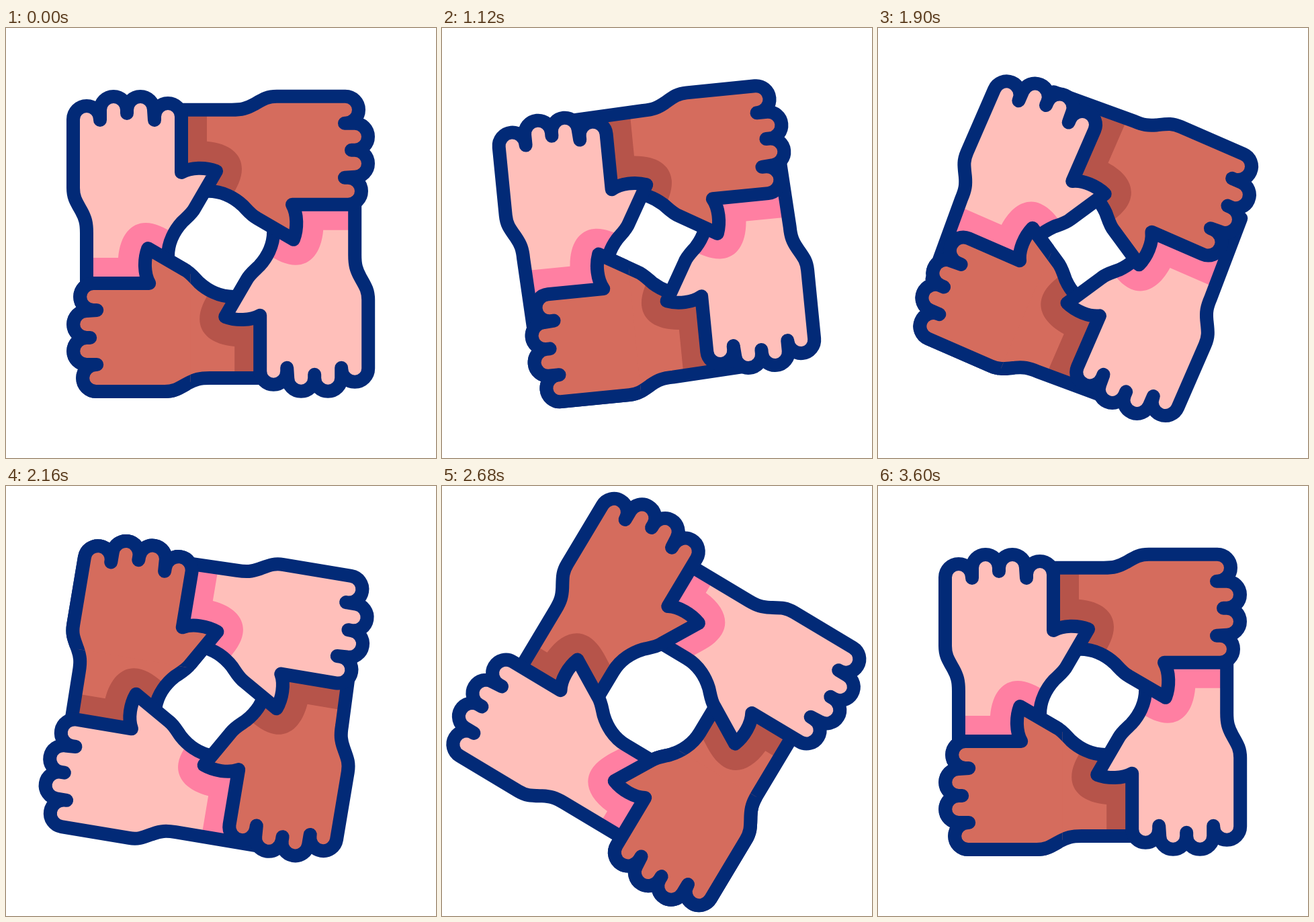
Write an HTML page with a canvas that moves like this. It is 640x640 px and loops after 3620 ms.

```html
<!DOCTYPE html>
<html lang="en">
<head>
<meta charset="utf-8">
<title>Linked hands</title>
<style>
  html, body { margin: 0; width: 100%; height: 100%; overflow: hidden; background: #fff; }
  canvas { display: block; width: 100vw; height: 100vh; }
</style>
</head>
<body>
<canvas id="stage" width="640" height="640"></canvas>
<script>
const ctx = document.getElementById('stage').getContext('2d');
const LOOP = 3620, STAGGER = 60;
const CX = 319.6, CY = 321.4;
const NAVY = '#022a77';
const SKIN = [
  { base: '#ffbfba', shade: '#ff7fa2' },
  { base: '#d56c5d', shade: '#b6544a' }
];

// Upright hand: wrist, four fingers, thumb; the wrist leans in by `lean`
const handPath = lean => new Path2D(`M${120 + lean} 432 L120 305
  C120 290 118 283 112 272 C104 258 100 252 100 238 V136
  A20 20 0 0 1 140 136 V137 V122 A20 20 0 0 1 180 122 V127 V122 A20 20 0 0 1 220 122
  L221 137 V132 A20 20 0 0 1 261 132 V215 C275 207 297 207 313 213
  L281 268 C277 276 268 283 262 289 C252 300 241 318 241 340 V432 Z`);
// Shade cast by the neighbouring hand
const shade = new Path2D(`M40 342 H167 C170 308 186 290 208 290
  C222 290 236 297 250 306 L310 342 V460 H40 Z`);

const phase = (t, from, to) => Math.min(1, Math.max(0, (t - from) / (to - from)));
const sine = u => (1 - Math.cos(Math.PI * u)) / 2;
const cubic = u => u < 0.5 ? 4 * u ** 3 : 1 - 4 * (1 - u) ** 3;

// Distance covered when speeding up, cruising and braking
function travel(t, total, time, up, down) {
  const speed = total / (time - (up + down) / 2);
  if (t <= 0) return 0;
  if (t >= time) return total;
  if (t < up) return speed * t * t / (2 * up);
  if (t < time - down) return speed * (t - up / 2);
  return total - speed * (time - t) ** 2 / (2 * down);
}

// Wind up a little, then one full turn
const angle = t => -7.1 * sine(phase(t, 0, 1600)) + travel(t - 1600, 367.1, 1290, 570, 115);

// Pull in, fling out, settle
const slide = t => -26.5 * cubic(phase(t, 0, 1700))
  + 51.5 * sine(phase(t, 1700, 2560))
  - 25 * sine(phase(t, 2560, 3400));

// The ring swings off centre during the turn
function drift(t) {
  const u = phase(t, 1600, 2720);
  return [-16 * sine(2 * u), 8 * (1 - u) ** 2 * Math.sin(2 * Math.PI * u)];
}

function drawHand(k, out) {
  const skin = SKIN[k % 2];
  const hand = handPath(0.3 * Math.max(0, -out[k]));
  ctx.save();
  ctx.rotate(k * Math.PI / 2);
  ctx.translate(-CX, -CY - out[k]);
  ctx.fillStyle = skin.base;
  ctx.fill(hand);
  ctx.save();
  ctx.clip(hand);
  ctx.translate(-out[(k + 3) % 4], out[k]);
  ctx.fillStyle = skin.shade;
  ctx.fill(shade);
  ctx.restore();
  ctx.stroke(hand);
  ctx.restore();
}

function draw(t) {
  const out = [0, 1, 2, 3].map(k => slide(t - STAGGER * ((k + 2) % 4)));
  const [dx, dy] = drift(t);
  ctx.fillStyle = '#fff';
  ctx.fillRect(0, 0, 640, 640);
  ctx.save();
  ctx.translate(CX + dx, CY + dy);
  ctx.rotate(angle(t) * Math.PI / 180);
  ctx.strokeStyle = NAVY;
  ctx.lineWidth = 20;
  ctx.lineJoin = ctx.lineCap = 'round';
  for (let k = 3; k >= 0; k--) drawHand(k, out);
  // Close the ring: the last hand also lies over the first
  ctx.beginPath();
  ctx.rect(-400, -400, 355, 800);
  ctx.clip();
  drawHand(3, out);
  ctx.restore();
}

let start;
function tick(now) {
  start ??= now;
  draw((now - start) % LOOP);
  requestAnimationFrame(tick);
}
draw(0);
requestAnimationFrame(tick);
</script>
</body>
</html>
```
